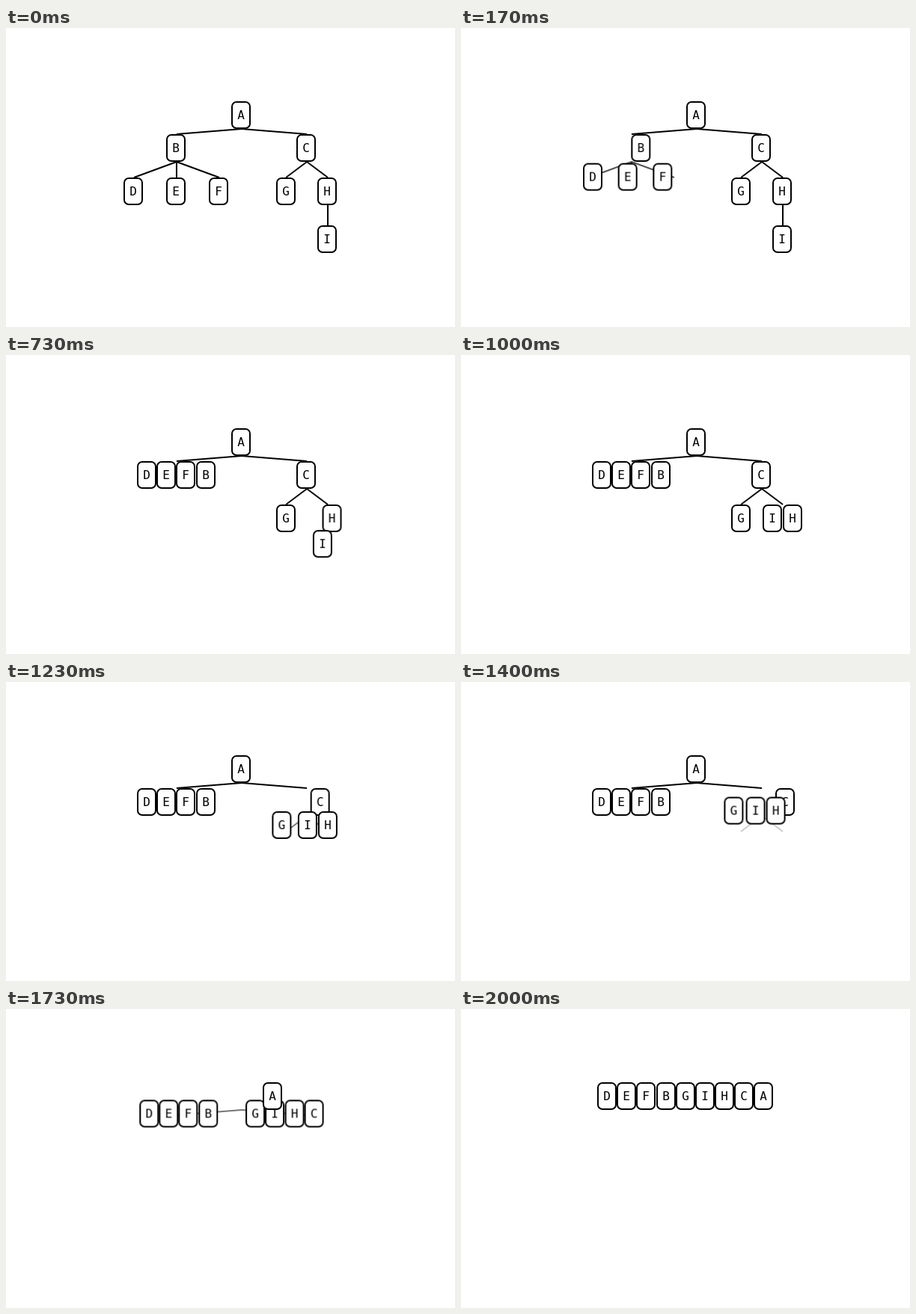
These frames come from a looping animation (600x400 px, 3.67 s). An HTML page:

```html
<!DOCTYPE html>
<html lang="en">
<head>
<meta charset="utf-8">
<title>Postorder flattening of a tree</title>
<style>
  html, body { margin: 0; width: 100%; height: 100%; overflow: hidden; background: #fff; }
  svg { position: absolute; left: 0; top: 0; width: 600px; height: 400px; }

  /* Four linear phases of 500 ms at 30 steps per second, then a rest. */
  .node, .edge { animation: move 3670ms steps(15, end) -4ms infinite; }
  .edge { animation-name: fade; stroke: #000; stroke-width: 2; }
  .node {
    position: absolute; left: 0; top: 0;
    width: 22px; height: 33px;
    border: 2px solid #000; border-radius: 7px;
    background: #fff; color: #000;
    font: 16px/33px "DejaVu Sans Mono", monospace;
    text-align: center;
    will-change: transform;
  }

  @keyframes move {
    0% { transform: var(--s0); }
    13.624% { transform: var(--s1); }
    27.248% { transform: var(--s2); }
    40.872% { transform: var(--s3); }
    54.496%, 100% { transform: var(--s4); }
  }
  @keyframes fade {
    0% { opacity: var(--s0); }
    13.624% { opacity: var(--s1); }
    27.248% { opacity: var(--s2); }
    40.872% { opacity: var(--s3); }
    54.496%, 100% { opacity: var(--s4); }
  }
</style>
</head>
<body>
<svg id="edges" viewBox="0 0 600 400"></svg>
<script>
  const PHASES = 4;
  const PITCH = 26.13;
  const HEIGHT = 37;
  const ANCHOR = 13.6;
  const LEVELS = [98, 142, 200, 264];
  const FINAL_X = 286.65;

  const edges = document.getElementById('edges');
  const nodes = [];
  const mean = values => values.reduce((sum, value) => sum + value, 0) / values.length;

  const leaf = (name, x) => ({ name, x, children: [] });
  // A parent stands centred above its children.
  const parent = (name, ...children) => ({ name, x: mean(children.map(child => child.x)), children });

  const root = parent('A',
    parent('B', ...[...'DEF'].map((name, i) => leaf(name, 157.36 + 57 * i))),
    parent('C', leaf('G', 360.51), parent('H', leaf('I', 416.45))));

  function place(node, depth = 0) {
    node.y = LEVELS[depth];
    node.depth = depth;
    node.stops = [[node.x, node.y]];
    nodes.push(node);
    node.children.forEach(child => place(child, depth + 1));
  }

  // Postorder: each parent draws its flattened subtrees into one row around itself.
  let phase = 0;
  function flatten(node) {
    const row = [...node.children.flatMap(flatten), node];
    if (!node.children.length) return row;
    node.phase = ++phase;
    const centre = node === root ? FINAL_X : node.x;
    row.forEach((member, i) => {
      member.stops[phase] = [centre + (i - (row.length - 1) / 2) * PITCH, node.y];
    });
    return row;
  }

  function setStops(element, valueAt) {
    for (let stop = 0; stop <= PHASES; stop++) element.style.setProperty('--s' + stop, valueAt(stop));
  }

  function drawNode(node) {
    const box = document.createElement('div');
    box.className = 'node';
    box.textContent = node.name;
    // Deeper nodes lie in front of their parents, the root in front of all.
    box.style.zIndex = node.depth || LEVELS.length;
    let position;
    setStops(box, stop => {
      position = node.stops[stop] || position;
      return `translate(${Math.round(position[0])}px, ${position[1]}px)`;
    });
    document.body.append(box);
  }

  function drawEdge(from, to) {
    const line = document.createElementNS('http://www.w3.org/2000/svg', 'line');
    const ends = { x1: from.x + ANCHOR, y1: from.y + HEIGHT, x2: to.x + ANCHOR, y2: to.y };
    for (const [name, value] of Object.entries(ends)) line.setAttribute(name, value);
    line.classList.add('edge');
    setStops(line, stop => stop < from.phase ? 1 : 0);
    edges.append(line);
  }

  place(root);
  flatten(root);
  nodes.forEach(node => {
    drawNode(node);
    node.children.forEach(child => drawEdge(node, child));
  });
</script>
</body>
</html>
```
